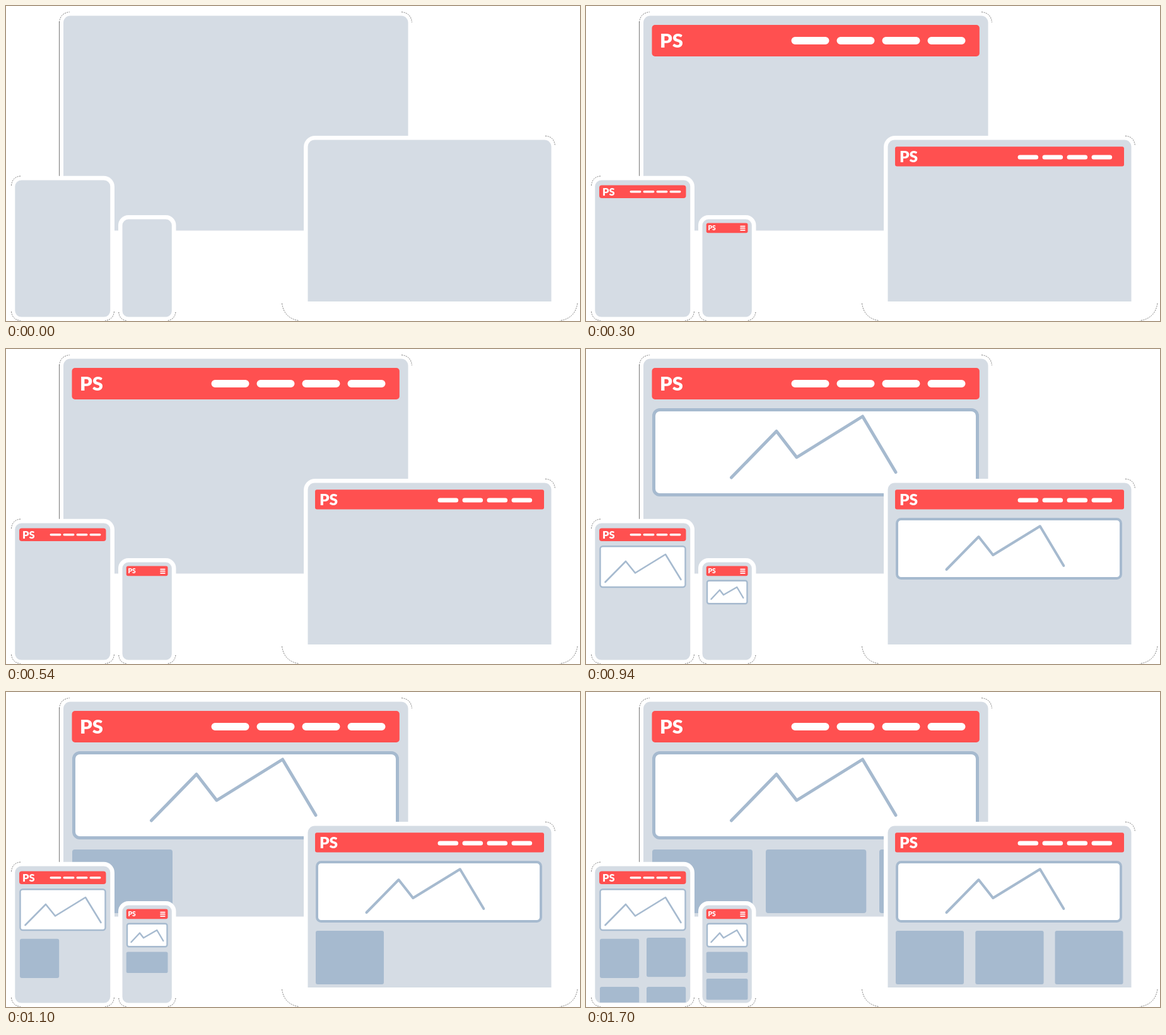
Recreate the animation shown at these times as an HTML page. Size 910 px wide and 500 px high, loop 2000 ms.

```html
<!DOCTYPE html>
<html lang="en">
<head>
<meta charset="utf-8">
<title>Responsive layout</title>
<style>
  html, body { margin: 0; width: 100%; height: 100%; overflow: hidden; background: #fff; }
  svg { display: block; width: 910px; height: 500px; }
  .frame, .chart { fill: #fff; }
  .screen { fill: #d5dce4; }
  .header { fill: #ff5050; }
  .card { fill: #a6bacf; }
  .chart { stroke: #a6bacf; }
  .trend { fill: none; stroke: #a6bacf; stroke-linecap: round; stroke-linejoin: round; }
  .nav { fill: none; stroke: #fff; stroke-linecap: round; }
  .edge { fill: none; stroke: #555; stroke-width: .8; }
  .corner { stroke-dasharray: 2 1.5; }
  text { fill: #fff; font-family: Lato, "Open Sans", sans-serif; font-weight: 900; }
</style>
</head>
<body>
<svg viewBox="0 0 910 500">
  <!-- Desktop -->
  <path class="screen" d="M91 356.5V26.5a11 11 0 0 1 11-11H626.5a11 11 0 0 1 11 11V356.5Z"/>
  <path class="edge" d="M84.5 25V270"/>
  <path class="edge corner" d="M84.5 26Q86 11 101 9.5M627 9.5Q642 11 643.5 26"/>
  <g data-at="300">
    <rect class="header" x="104.5" y="30" width="519.3" height="50" rx="5"/>
    <text x="117" y="66" font-size="31">PS</text>
    <path class="nav" d="M331.5 55H595.5" stroke-width="12" stroke-dasharray="48 24"/>
  </g>
  <g data-at="700">
    <rect class="chart" x="107.5" y="96.5" width="513" height="135" rx="9.5" stroke-width="5"/>
    <polyline class="trend" points="230.5,204 302,130.5 334,172 438.5,107 491,195.5" stroke-width="5"/>
  </g>
  <rect class="card" data-at="1100" x="105" y="250" width="159" height="101" rx="4"/>
  <rect class="card" data-at="1400" x="285" y="250" width="159.3" height="101" rx="4"/>
  <rect class="card" data-at="1700" x="465" y="250" width="159" height="101" rx="4"/>

  <!-- Laptop -->
  <path class="frame" d="M472 470V224a18 18 0 0 1 18-18H853a18 18 0 0 1 18 18V470Z"/>
  <path class="screen" d="M478.5 469V223.5a11 11 0 0 1 11-11H853.5a11 11 0 0 1 11 11V469Z"/>
  <path class="edge corner" d="M855 206.3Q869 207 870.5 222M437.5 472Q441 496 465 499.5M906 472Q902 496 878 499.5"/>
  <g data-at="300">
    <rect class="header" x="490" y="223.3" width="363" height="31.2" rx="3"/>
    <text x="497" y="248" font-size="24.5">PS</text>
    <path class="nav" d="M688 240H830.6" stroke-width="7" stroke-dasharray="25.6 13.4"/>
  </g>
  <g data-at="700">
    <rect class="chart" x="493" y="270" width="355" height="94" rx="6.5" stroke-width="4"/>
    <polyline class="trend" points="571.5,350 622.5,298 645.3,327 719.8,281.3 757.3,344" stroke-width="4"/>
  </g>
  <rect class="card" data-at="1100" x="491" y="379" width="108" height="85" rx="3"/>
  <rect class="card" data-at="1400" x="617.3" y="379" width="108.3" height="85" rx="3"/>
  <rect class="card" data-at="1700" x="743.5" y="379" width="108" height="85" rx="3"/>

  <!-- Tablet -->
  <rect class="frame" x="8" y="269.7" width="164" height="230.3" rx="17"/>
  <rect class="screen" x="14.3" y="276.6" width="151" height="217" rx="10"/>
  <path class="edge corner" d="M8.5 285Q10 271 23 270M8.5 485Q10 498 23 499.5M171.5 485Q170 498 157 499.5"/>
  <g data-at="300">
    <rect class="header" x="21" y="284.4" width="137.5" height="20.7" rx="4"/>
    <text x="26" y="300.5" font-size="16.5">PS</text>
    <path class="nav" d="M71.3 294.8H148.8" stroke-width="3.6" stroke-dasharray="14.4 6.6"/>
  </g>
  <g data-at="700">
    <rect class="chart" x="22.5" y="313.2" width="135" height="64.8" rx="4" stroke-width="2.4"/>
    <polyline class="trend" points="30.5,370 63,337 78,355.5 126,326 150.5,366" stroke-width="2.6"/>
  </g>
  <rect class="card" data-at="1100" x="22" y="391.7" width="62.2" height="62.3" rx="3"/>
  <rect class="card" data-at="1400" x="96" y="390" width="62.2" height="62.2" rx="3"/>
  <path class="card" data-at="1700" d="M22 492.8V471a3 3 0 0 1 3-3H81.2a3 3 0 0 1 3 3V492.8ZM96 492.8V471a3 3 0 0 1 3-3H155.2a3 3 0 0 1 3 3V492.8Z"/>

  <!-- Phone -->
  <rect class="frame" x="178" y="332" width="91.5" height="168" rx="16"/>
  <rect class="screen" x="184.5" y="338.6" width="78.3" height="155" rx="9.5"/>
  <path class="edge corner" d="M178.7 486Q180 498 191 499.5M269 486Q267 498 256 499.5"/>
  <g data-at="300">
    <rect class="header" x="190.7" y="344.5" width="65.8" height="15.7" rx="3"/>
    <text x="193.5" y="356.2" font-size="10.3">PS</text>
    <path class="nav" d="M245.1 349.6H251.8M245.1 352.7H251.8M245.1 355.8H251.8" stroke-width="1.7"/>
  </g>
  <g data-at="700">
    <rect class="chart" x="192" y="367.7" width="63.5" height="36.5" rx="3" stroke-width="2.4"/>
    <polyline class="trend" points="198.5,397 212,382.5 218,390.3 239.3,378 249.3,395" stroke-width="2.4"/>
  </g>
  <rect class="card" data-at="1100" x="190.7" y="412.5" width="65.8" height="33.5" rx="2.5"/>
  <rect class="card" data-at="1400" x="190.7" y="455" width="65.8" height="33.6" rx="2.5"/>
</svg>
<script>
  const LOOP = 2000;
  const parts = [...document.querySelectorAll('[data-at]')];

  function render(now) {
    const time = now % LOOP;
    for (const part of parts) {
      part.style.visibility = time >= Number(part.dataset.at) ? 'visible' : 'hidden';
    }
  }

  const start = performance.now();
  function tick() {
    render(performance.now() - start);
    requestAnimationFrame(tick);
  }
  tick();
</script>
</body>
</html>
```
